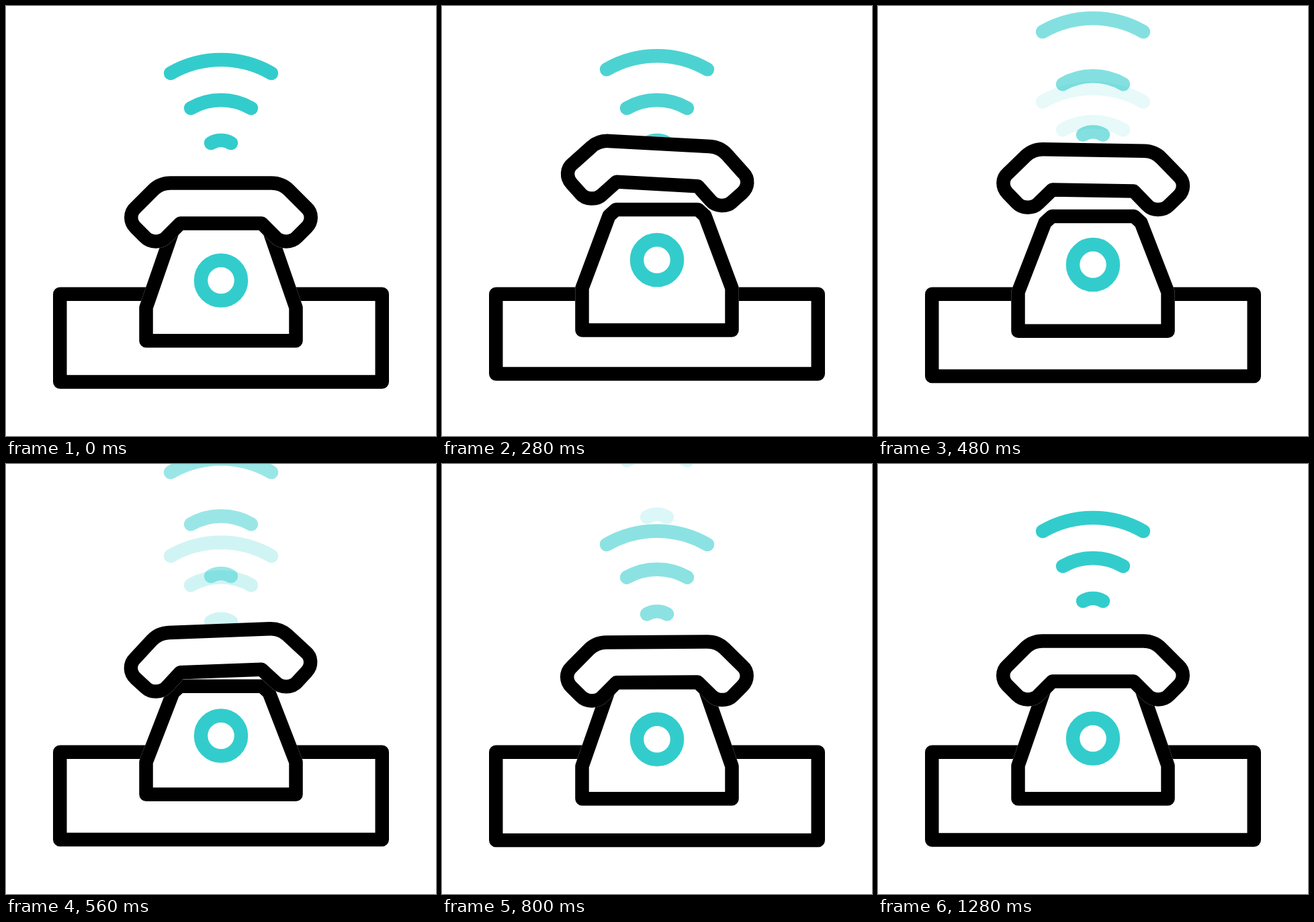
Animation of 640 by 640 pixels, one loop 1480 ms. Source, as an HTML page with a canvas:

```html
<!DOCTYPE html>
<html lang="en">
<head>
<meta charset="utf-8">
<title>Ringing telephone</title>
<style>
  html, body { margin: 0; width: 100%; height: 100%; overflow: hidden; background: #fff; }
  canvas { display: block; }
</style>
</head>
<body>
<canvas id="stage" width="640" height="640"></canvas>
<script>
const ctx = document.getElementById('stage').getContext('2d');
const TEAL = '#33cccc', LINE = 20.5, CENTER = 320, PIVOT = 327;
const LOOP = 1480, HOLD = 200, STEP = 40, LAST = 28;

// Handset jump: step, height, tilt in degrees. Every other part follows it.
const jump = [[0, 0, 0], [3, -58.6, 3.1], [8, -49, 1], [12, 16, -4.7], [16, 1.4, -0.4], [20, 0, 0]];

// Radius, step of departure, rising pace, arriving speed
const waves = [
  { r: 150, leave: 2.4, pace: 0.87, speed: 2.85 },
  { r: 90, leave: 5, pace: 1, speed: 1.95 },
  { r: 30, leave: 6.9, pace: 1, speed: 1.9 }
];

const handset = new Path2D('M245 263.5H395C405 263.5 414 267 421 274L447 300' +
  'C456 308 456 321 447 330L433 344C425 352.5 409 352.5 401 344L380.5 323.5H259.5' +
  'L239 344C231 352.5 215 352.5 207 344L193 330C184 321 184 308 193 300' +
  'L219 274C226 267 235 263.5 245 263.5Z');

const clamp = v => Math.max(0, Math.min(1, v));

// Smooth curve through one column of the jump
function jumpAt(k, col) {
  const end = jump.length - 1;
  if (k >= jump[end][0]) return 0;
  const i = jump.findIndex(p => p[0] > k) - 1;
  const slope = j => j === 0 || j === end ? 0 :
    (jump[j + 1][col] - jump[j - 1][col]) / (jump[j + 1][0] - jump[j - 1][0]);
  const a = jump[i][col], b = jump[i + 1][col];
  const h = jump[i + 1][0] - jump[i][0], u = (k - jump[i][0]) / h;
  return a + (b - a) * u * u * (3 - 2 * u) +
    h * u * (1 - u) * (slope(i) * (1 - u) - slope(i + 1) * u);
}

function outline(path) {
  ctx.fillStyle = ctx.strokeStyle = '#fff';
  ctx.fill(path);
  ctx.stroke(path);
  ctx.strokeStyle = '#000';
  ctx.stroke(path);
}

function drawWave(r, dy, alpha) {
  ctx.globalAlpha = alpha;
  ctx.beginPath();
  ctx.arc(CENTER, 230 + dy, r, -Math.PI * 2 / 3, -Math.PI / 3);
  ctx.stroke();
}

function drawWaves(k) {
  const arriving = clamp((k - 5.9) / 18), rising = clamp(1 - (k - 0.6) * 0.054);
  ctx.strokeStyle = TEAL;
  waves.forEach(({ r, speed }, i) => {
    drawWave(r, speed * Math.max(0, 22.9 + 1.65 * i - k), arriving);
  });
  for (const { r, leave, pace } of waves) {
    const x = Math.max(0, k - leave);
    drawWave(r, -pace * x * (11 + 0.3 * x), rising);
  }
  ctx.globalAlpha = 1;
}

function drawTray(hop, tilt) {
  const tray = new Path2D();
  tray.rect(80.25, 428.75, 479.5, 130.75 + 0.157 * hop - 0.914 * tilt);
  outline(tray);
}

function drawBody(hop, tilt) {
  const top = 323.5 + 0.131 * hop - 4.17 * tilt;
  const shoulder = 449 + 0.453 * hop - 0.8 * tilt;
  const foot = 498.3 + Math.min(0, 0.312 * hop + 0.81 * tilt);
  const half = [[111.5, foot], [111.5, shoulder], [71.4, top + 9.5], [61, top]];
  const body = new Path2D();
  for (const [x, y] of half) body.lineTo(CENTER - x, y);
  for (const [x, y] of half.reverse()) body.lineTo(CENTER + x, y);
  body.closePath();
  outline(body);

  ctx.strokeStyle = TEAL;
  ctx.beginPath();
  ctx.arc(CENTER, 408.5 + 0.45 * hop - 1.34 * tilt, 30, 0, Math.PI * 2);
  ctx.stroke();
}

function drawHandset(hop, tilt) {
  ctx.save();
  ctx.translate(CENTER, PIVOT + hop);
  ctx.rotate(tilt * Math.PI / 180);
  ctx.translate(-CENTER, -PIVOT);
  outline(handset);
  ctx.restore();
}

function draw(time) {
  const t = time % LOOP;
  const k = t < HOLD ? 0 : Math.min(LAST, Math.floor((t - HOLD) / STEP) + 1);
  const hop = jumpAt(k, 1), tilt = jumpAt(k, 2);

  ctx.fillStyle = '#fff';
  ctx.fillRect(0, 0, 640, 640);
  ctx.lineWidth = LINE;
  ctx.lineCap = ctx.lineJoin = 'round';
  drawWaves(k);
  drawTray(hop, tilt);
  drawBody(hop, tilt);
  drawHandset(hop, tilt);
}

const start = performance.now();
function tick() {
  draw(performance.now() - start);
  requestAnimationFrame(tick);
}
tick();
</script>
</body>
</html>
```
